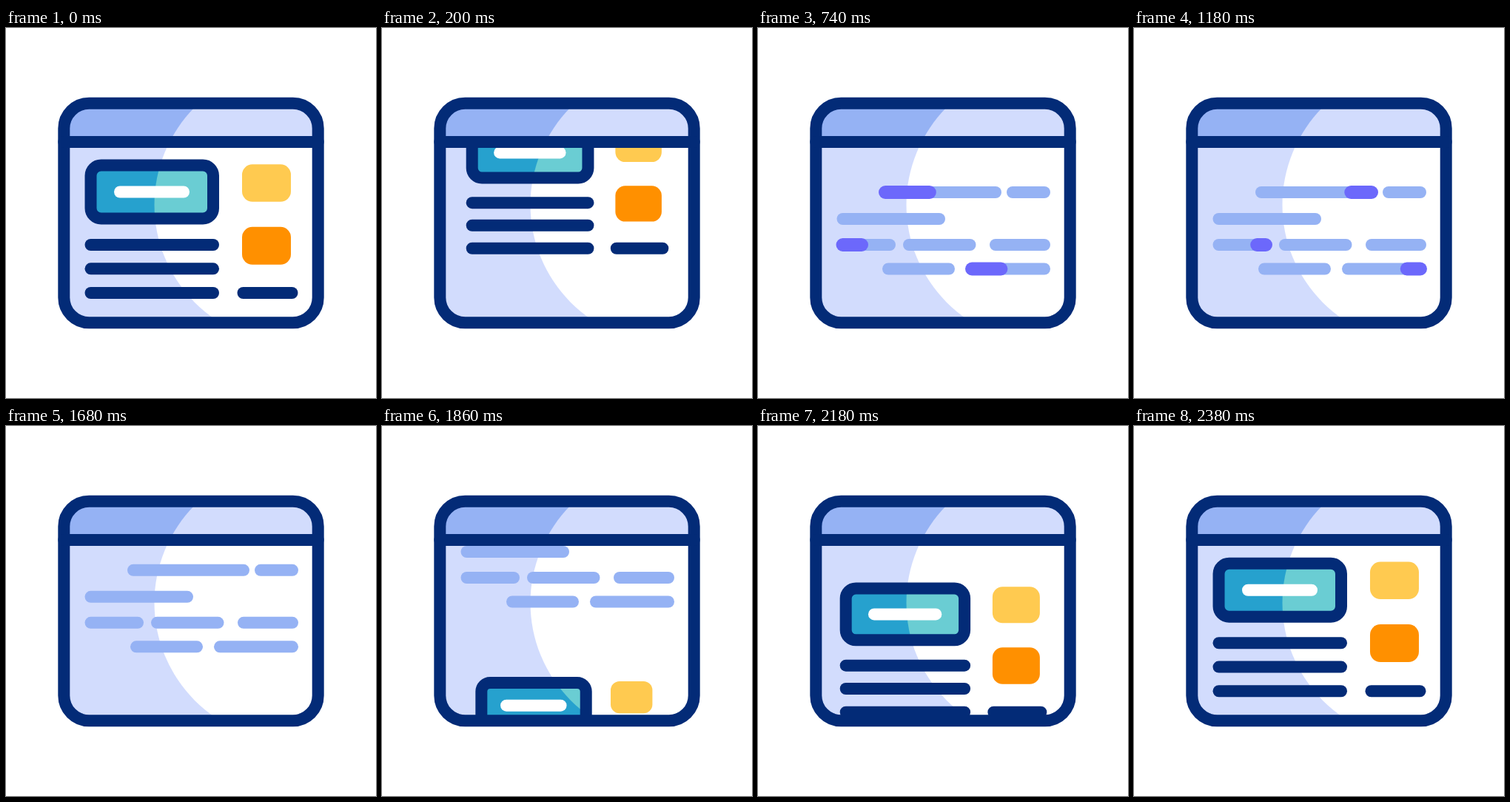
Recreate the animation shown at these times as an HTML page. Size 500 by 500 pixels, loop 2.4 s.

```html
<!DOCTYPE html>
<html lang="en">
<head>
<meta charset="utf-8">
<title>Web page and code</title>
<style>
  html, body { margin: 0; width: 100%; height: 100%; overflow: hidden; background: #fff; }
  svg { display: block; width: 500px; height: 500px; }
  .line { fill: none; stroke-width: 16; stroke-linecap: round; vector-effect: non-scaling-stroke; }
  .navy { stroke: #032b77; }
  .blue { stroke: #95b2f4; }
  .white { stroke: #fff; }
  .mark { stroke: #6c68fb; stroke-width: 18; }
</style>
</head>
<body>
<svg viewBox="0 0 500 500">
  <defs>
    <clipPath id="inner"><rect x="78" y="101.5" width="344" height="297" rx="34"/></clipPath>
    <clipPath id="body"><rect x="78" y="154" width="344" height="244"/></clipPath>
    <clipPath id="disc"><circle cx="387" cy="239" r="186.5"/></clipPath>
  </defs>
  <g clip-path="url(#inner)">
    <rect x="78" y="101" width="344" height="298" fill="#d2dcfd"/>
    <rect x="78" y="101" width="344" height="53" fill="#95b2f4"/>
    <g clip-path="url(#disc)">
      <rect x="78" y="101" width="344" height="53" fill="#d2dcfd"/>
      <rect x="78" y="154" width="344" height="245" fill="#fff"/>
    </g>
  </g>
  <g clip-path="url(#body)">
    <g class="page"><rect x="114.5" y="185.5" width="165.5" height="72" rx="14" fill="#26a1ce"/></g>
    <g clip-path="url(#disc)">
      <g class="page"><rect x="114.5" y="185.5" width="165.5" height="72" rx="14" fill="#6acdd3"/></g>
    </g>
    <g class="page" id="page">
      <rect class="line navy" x="114.5" y="185.5" width="165.5" height="72" rx="14"/>
      <g id="tiles">
        <rect x="319" y="184.3" width="66" height="50.5" rx="14" fill="#ffca50"/>
        <rect x="319" y="268.8" width="66" height="51" rx="14" fill="#ff9000"/>
      </g>
    </g>
    <g id="code"></g>
  </g>
  <rect class="line navy" x="78.3" y="101.8" width="343.4" height="296.4" rx="34"/>
  <path class="line navy" d="M78.3 154H421.7"/>
</svg>
<script>
const LOOP = 2400;
const $ = id => document.getElementById(id);
const pages = document.querySelectorAll('.page');
const ease = (t, from, to) => {
  const p = Math.min(1, Math.max(0, (t - from) / (to - from)));
  return (1 - Math.cos(Math.PI * p)) / 2;
};

function line(parent, color, x1, x2, y) {
  const el = document.createElementNS('http://www.w3.org/2000/svg', 'line');
  el.setAttribute('class', 'line ' + color);
  el.setAttribute('x1', x1);
  el.setAttribute('x2', x2);
  el.setAttribute('y1', y);
  el.setAttribute('y2', y);
  parent.appendChild(el);
  return el;
}

line($('page'), 'white', 154, 240, 221.5);
[293, 325.3, 358].forEach(y => line($('page'), 'navy', 114.5, 280, y));
line($('page'), 'navy', 320.5, 386.5, 358);

// x1, x2, y, highlighted
const rows = [
  [172, 321, 222, 1], [344, 387, 222],
  [114.5, 245, 258],
  [114.5, 178, 293, 1], [204, 286.5, 293], [321, 387, 293],
  [176, 258, 325.5], [289, 387, 325.5, 1]
];
rows.forEach(([a, b, y]) => line($('code'), 'blue', a, b, y));
const marks = rows.filter(r => r[3]).map(([a, b, y]) =>
  ({ a, b, el: line($('code'), 'mark', a, a, y) }));

function place(el, dy, s) {
  el.setAttribute('transform', `translate(250.5 ${250 + dy}) scale(${s}) translate(-250.5 -250)`);
}

function draw(t) {
  const up = ease(t, 20, 615);
  const back = ease(t, 1480, 2400);
  const second = t >= 1480;

  const pageY = second ? 240 * (1 - back) : -258 * up;
  const pageScale = second ? 1 - 0.23 * (1 - back) : 1 - 0.25 * up;
  pages.forEach(el => place(el, pageY, pageScale));
  $('tiles').setAttribute('transform', `translate(0 ${second ? -1 : 0})`);

  place($('code'), second ? -240 * back : 258 * (1 - up), 1 - 0.25 * (1 - up));

  const head = ease(t, 540, 1000);
  const tail = ease(t, 785, 1338);
  for (const { a, b, el } of marks) {
    el.setAttribute('x1', a + (b - a) * tail);
    el.setAttribute('x2', a + (b - a) * head);
    el.setAttribute('visibility', head > tail ? 'visible' : 'hidden');
  }
}

const start = performance.now();
function tick() {
  draw((performance.now() - start) % LOOP);
  requestAnimationFrame(tick);
}
draw(0);
requestAnimationFrame(tick);
</script>
</body>
</html>
```
